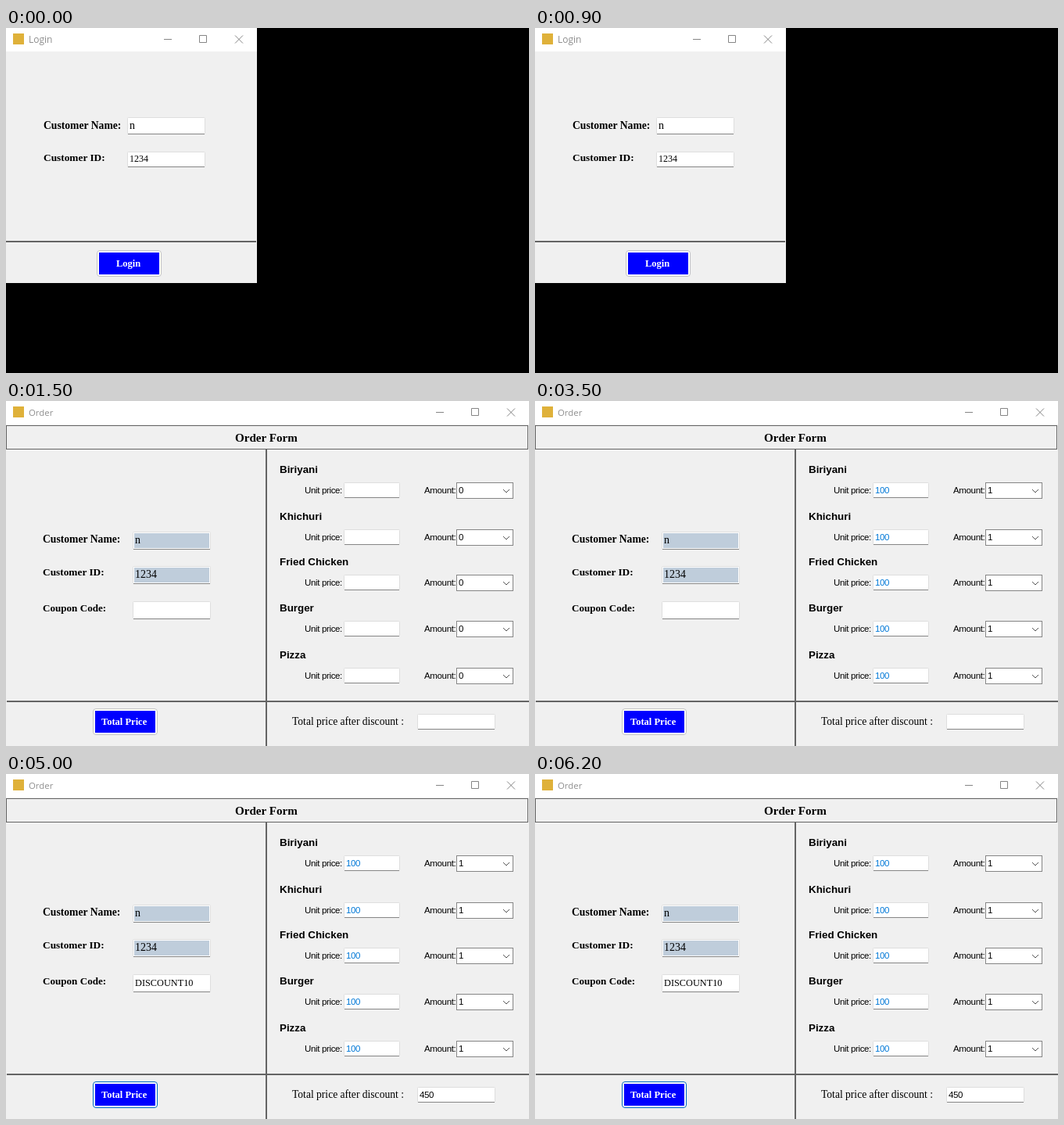
An HTML page for the animation above (7000 ms loop, 669 by 441 pixels).

```html
<!DOCTYPE html>
<html lang="en">
<head>
<meta charset="utf-8">
<title>Order form</title>
<style>
html, body { margin: 0; width: 100%; height: 100%; overflow: hidden; background: #000; }
svg { display: block; width: 669px; height: 441px; }
text { white-space: pre; }
.serif { font-family: "Liberation Serif", Cambria, serif; }
.sans { font-family: "Liberation Sans", Arial, sans-serif; }
.small { font-size: 11.5px; letter-spacing: -.35px; }
.caption { font-family: "Open Sans", "Segoe UI", sans-serif; fill: #8f8f8f; }
.bold { font-weight: 700; }
.rule { fill: #646464; }
</style>
</head>
<body>
<svg id="stage" viewBox="0 0 669 441"></svg>
<script>
const LOOP = 7000;
const OPEN = 1500, FILL = 3500, TOTAL = 5000;
const dishes = [["Biriyani", 104], ["Khichuri", 164], ["Fried Chicken", 222], ["Burger", 281], ["Pizza", 341]];

const rect = (x, y, w, h, fill, more = "") =>
  `<rect x="${x}" y="${y}" width="${w}" height="${h}" fill="${fill}" ${more}/>`;

const text = (s, x, y, cls, size, more = "") =>
  `<text x="${x}" y="${y}" class="${cls}" ${size ? `font-size="${size}"` : ""} ${more}>${s}</text>`;

const label = (s, x, y, size) => text(s, x, y, "serif bold", size);

const rule = (x, y, w, h) => `<rect class="rule" x="${x}" y="${y}" width="${w}" height="${h}"/>`;

function field(x, y, w, h, fill = "#fff") {
  const inner = fill === "#fff" ? "" : rect(x + 2, y + 2, w - 4, h - 4, fill);
  return rect(x + .5, y + .5, w - 1, h - 1, "#fff", 'rx="1" stroke="#dedede"') +
    inner + rect(x + 1, y + h - 1, w - 2, 1, "#868686");
}

function combo(x, y) {
  return rect(x + .5, y + .5, 72, 20, "#fff", 'stroke="#858585"') +
    `<path d="M${x + 60} ${y + 9}l4 4l4 -4" fill="none" stroke="#555"/>`;
}

function button(id, s, x, y, tx) {
  return rect(x + .5, y + .5, 82, 33, "#fdfdfd", `id="${id}" rx="3.5" stroke="#c4c4c4"`) +
    rect(x + 3, y + 3, 77, 28, "#00f") +
    text(s, tx, y + 21, "serif bold", 12.5, 'fill="#fff"');
}

function frame(title, size, w, h) {
  const x = w - 119;
  return rect(0, 0, w, h, "#f0f0f0") + rect(0, 0, w, 30, "#fff") +
    rect(9, 7, 14, 14, "#dfb13a") +
    text(title, 29, 19, "caption", size) +
    `<path d="M${x} 14.5h10M${x + 45.5} 9.5h9v9h-9zM${x + 91} 9.5l10 10m0 -10l-10 10" fill="none" stroke="#858585"/>`;
}

function loginWindow() {
  return frame("Login", 12, 321, 326) +
    label("Customer Name:", 48, 129, 13.65) + field(155, 114, 100, 22) +
    text("n", 158, 129, "serif", 14) +
    label("Customer ID:", 48, 170, 13.35) + field(155, 158, 100, 20) +
    text("1234", 158, 171, "serif", 12) +
    rule(0, 272, 320, 2) +
    button("login-edge", "Login", 116, 284, 141);
}

function dishRow([name, y]) {
  return text(name, 350, y - 12, "sans bold", 13.35) +
    text("Unit price:", 382, y + 14, "sans small") + field(432, y, 72, 20) +
    text("100", 435, y + 14, "sans small price", 0, 'fill="#0078d7"') +
    text("Amount:", 535, y + 14, "sans small") + combo(576, y) +
    text("0", 579, y + 14, "sans small amount");
}

function orderWindow() {
  const locked = "#bfcddb";
  return frame("Order", 11.4, 669, 441) +
    rect(.5, 31.5, 667, 30, "#f0f0f0", 'stroke="#646464"') +
    label("Order Form", 293, 52, 15.1) +
    rule(332, 62, 2, 379) + rule(1, 383, 668, 2) +
    label("Customer Name:", 47, 181, 13.65) + field(162, 167, 100, 23, locked) +
    text("n", 165, 182, "serif", 14) +
    label("Customer ID:", 47, 223, 13.35) + field(162, 211, 100, 23, locked) +
    text("1234", 165, 226, "serif", 14) +
    label("Coupon Code:", 47, 269, 13.1) + field(162, 256, 100, 23) +
    text("DISCOUNT10", 165, 271, "serif", 12.3, 'id="coupon"') +
    dishes.map(dishRow).join("") +
    button("total-edge", "Total Price", 111, 393, 122) +
    text("Total price after discount :", 366, 414, "serif", 13.57) +
    field(526, 400, 100, 20) +
    text("450", 529, 414, "sans small", 0, 'id="total"');
}

const stage = document.getElementById("stage");
stage.innerHTML = `<g id="login">${loginWindow()}</g><g id="order">${orderWindow()}</g>`;
const byId = id => document.getElementById(id);
const login = byId("login"), order = byId("order");
const coupon = byId("coupon"), total = byId("total"), edge = byId("total-edge");
const prices = stage.querySelectorAll(".price"), amounts = stage.querySelectorAll(".amount");
const show = (el, on) => el.setAttribute("visibility", on ? "visible" : "hidden");

function render(t) {
  const filled = t >= FILL, done = t >= TOTAL;
  login.style.display = t < OPEN ? "" : "none";
  order.style.display = t < OPEN ? "none" : "";
  prices.forEach(el => show(el, filled));
  amounts.forEach(el => { el.textContent = filled ? "1" : "0"; });
  show(coupon, done);
  show(total, done);
  edge.setAttribute("stroke", done ? "#0067c0" : "#c4c4c4");
}

const start = performance.now();
function tick() {
  render((performance.now() - start) % LOOP);
  requestAnimationFrame(tick);
}
tick();
</script>
</body>
</html>
```
